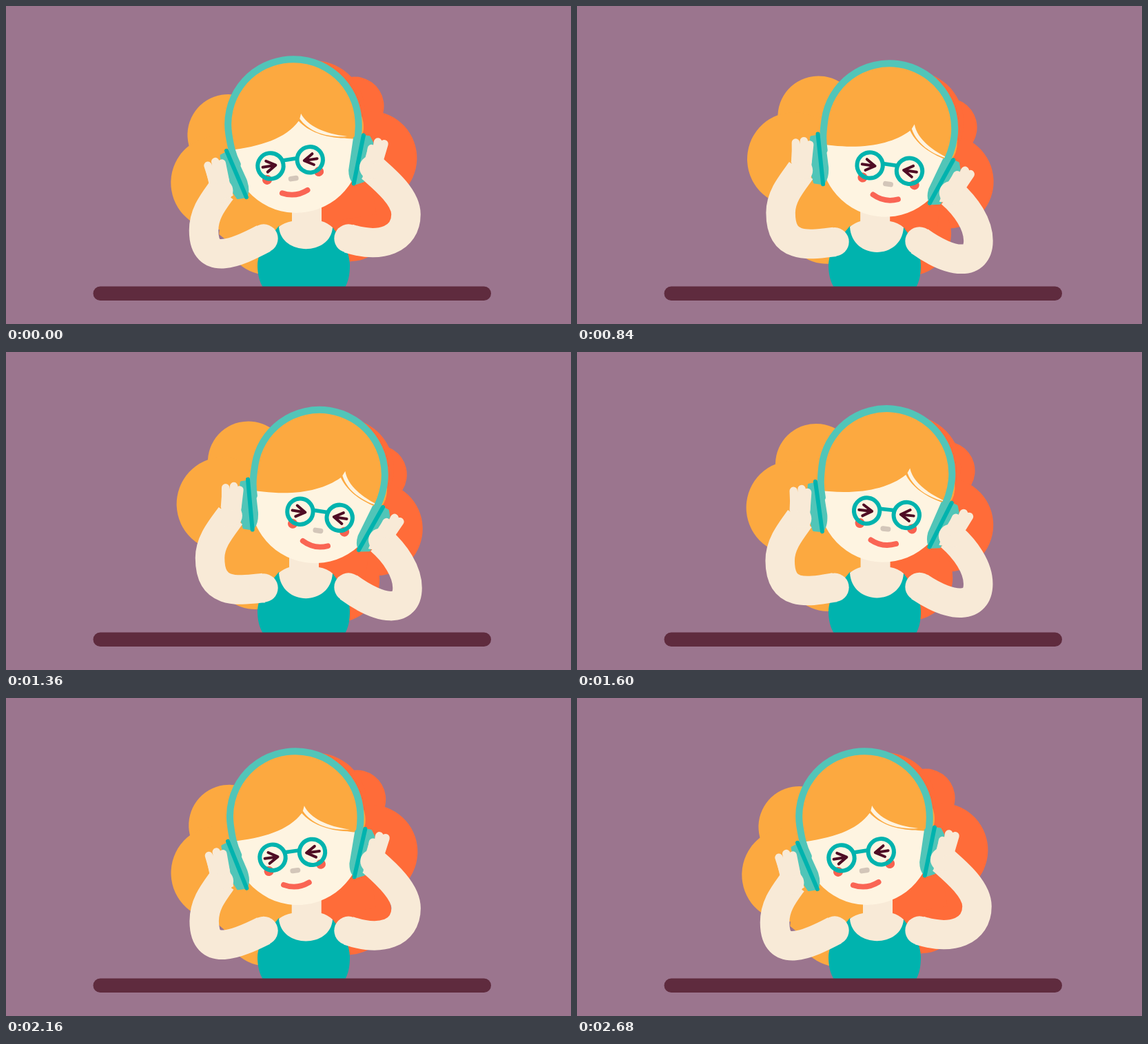
Write an HTML page that moves like this. It is 820 px wide and 461 px high and loops after 2.72 s.

```html
<!DOCTYPE html>
<html lang="en">
<head>
<meta charset="utf-8">
<title>Listening to music</title>
<style>
  html, body { margin: 0; width: 100%; height: 100%; overflow: hidden; background: #9b758e; }
  svg { display: block; width: 100%; height: 100%; }
  .line { fill: none; stroke-linecap: round; stroke-linejoin: round; }
  .yellow { fill: #fca940; }
  .orange { fill: #ff6c39; }
  .skin { fill: #f8ead7; }
  .finger { stroke: #f8ead7; }
  .arm { fill: none; stroke: #f8ead7; stroke-width: 42.5; }
  .face { fill: #fef4e1; }
  .teal { fill: #00b3ae; }
  .rim { stroke: #00b3ae; stroke-width: 6; }
  .pad { fill: #51c5b8; stroke: #51c5b8; stroke-width: 4; stroke-linejoin: round; }
  .eye { stroke: #4f0c24; stroke-width: 4; }
</style>
</head>
<body>
<svg viewBox="0 0 820 461">
  <defs>
    <clipPath id="skull">
      <path d="M341 175A95 95 0 0 1 531 175L530 205A95 97 0 0 1 340 205Z"/>
    </clipPath>
  </defs>

  <g id="hair">
    <g class="orange">
      <circle cx="524" cy="160" r="42.5"/>
      <circle cx="534" cy="238" r="68"/>
      <circle cx="490" cy="320" r="62"/>
      <path d="M430 170H530V320H430Z"/>
    </g>
    <g class="yellow">
      <circle cx="336" cy="172" r="59"/>
      <circle cx="310" cy="238" r="68"/>
      <circle cx="370" cy="320" r="62"/>
      <path d="M340 170H434V340H325L300 312Z"/>
    </g>
  </g>

  <path class="teal" d="M396 319C378 340 365 357 365 376C365 389 368 400 373 408H492C497 399 499 389 499 376C499 357 488 339 474 321Z"/>
  <path class="skin" id="chest"/>

  <g class="head">
    <circle class="orange" cx="468" cy="160" r="74.5"/>
    <ellipse class="yellow" cx="529" cy="186" rx="8" ry="20"/>
    <g clip-path="url(#skull)">
      <path class="face" d="M330 70H540V310H330Z"/>
      <g class="shift">
        <path class="yellow" id="fringe"/>
        <path class="face" d="M461 161C467 180 490 195 522 204C491 201 468 188 458 168Z"/>
      </g>
    </g>
    <g class="shift">
      <g fill="#f8614f">
        <circle cx="397.5" cy="248" r="7"/>
        <circle cx="473.5" cy="248" r="7"/>
      </g>
      <g class="line rim">
        <circle cx="405.5" cy="229" r="18.7"/>
        <circle cx="463.5" cy="229" r="18.7"/>
        <path stroke-linecap="butt" d="M424 224H445" stroke-width="5.5"/>
      </g>
      <path class="line eye" d="M400 221L413 229L400 237M394 229H413M468 221L455 229L468 237M474 229H455"/>
      <rect x="428" y="248.5" width="15" height="7.4" rx="3.7" fill="#d3c6b9"/>
      <path class="line" d="M416 270.5Q434 280 453 272" stroke="#fa6554" stroke-width="7.8"/>
    </g>
    <path class="line" d="M347 218C342 202 341.5 190 341.5 173A94.75 94 0 0 1 531 173C531 190 527 205 522 218" stroke="#51c5b8" stroke-width="10"/>
    <path class="pad" d="M326 202L338 198L345 206L355 242Q358 258 352 266L340 266L328 240Z"/>
    <path class="pad" d="M536 207L542 209L545 218L524 270L512 272Q505 266 507 252L521 207Z"/>
    <path class="line rim" d="M334.5 196L352.5 267M534.5 205L509.5 272"/>
  </g>

  <g id="arms"></g>

  <g class="head">
    <path class="skin" d="M300 214L329 213L334 262L316 264L302 242Z"/>
    <path class="line finger" d="M304.5 213L308 236M316 209L318 238M325 213L326 238" stroke-width="11.5"/>
    <path class="skin" d="M537 226L566 226L557 244L540 268L523 268L528 246Z"/>
    <path class="line finger" d="M543 226L537 246M553.5 218L546 242M562 222L552 243" stroke-width="12"/>
  </g>

  <rect x="126.5" y="406.5" width="577.5" height="20.5" rx="10.25" fill="#5f2b3e"/>
</svg>
<script>
  const HALF = 1360, SWING = 960, TILT = 9;
  const NECK = { x: 415, y: 295 };
  const $ = id => document.getElementById(id);
  const set = (el, attrs) => Object.entries(attrs).forEach(([k, v]) => el.setAttribute(k, v));
  const heads = document.querySelectorAll('.head');
  const shifts = document.querySelectorAll('.shift');

  function add(name, attrs) {
    const el = document.createElementNS('http://www.w3.org/2000/svg', name);
    set(el, attrs);
    return $('arms').appendChild(el);
  }

  const makeArm = () => ({
    limb: add('path', { class: 'arm' }),
    shoulder: add('circle', { class: 'skin', r: 20.7 }),
    wrist: add('circle', { class: 'skin', r: 17 })
  });
  const leftArm = makeArm(), rightArm = makeArm();

  // Sine swing followed by a slight settling drift.
  function progress(t) {
    const swing = 0.5 - 0.5 * Math.cos(Math.PI * Math.min(t / SWING, 1));
    return 0.985 * swing + 0.015 * t / HALF;
  }

  // A point that follows the tilting head.
  function onHead(x, y, s) {
    const a = TILT * s * Math.PI / 180, dx = x - NECK.x, dy = y - NECK.y;
    return [
      NECK.x + dx * Math.cos(a) - dy * Math.sin(a),
      NECK.y + dx * Math.sin(a) + dy * Math.cos(a)
    ];
  }

  // The limb leaves the shoulder along `out`, passes the elbow upright and reaches the wrist along `reach`.
  function drawArm(arm, [sx, sy], out, [ex, ey], bend, [wx, wy], reach) {
    set(arm.limb, {
      d: `M${sx} ${sy}C${sx + out[0]} ${sy + out[1]} ${ex} ${ey + bend} ${ex} ${ey}` +
         `C${ex} ${ey - 24} ${wx + reach[0]} ${wy + reach[1]} ${wx} ${wy}`
    });
    set(arm.shoulder, { cx: sx, cy: sy });
    set(arm.wrist, { cx: wx, cy: wy });
  }

  // s runs from -1 (tilted left) to 1 (tilted right).
  function pose(s) {
    set($('hair'), { transform: `rotate(${9.2 * s} 422 264)` });
    heads.forEach(g => set(g, { transform: `rotate(${TILT * s} ${NECK.x} ${NECK.y})` }));
    shifts.forEach(g => set(g, { transform: `translate(${11.3 * s} ${1.2 * s})` }));
    set($('fringe'), {
      d: `M300 60H570V212C550 212 530 210 518 206C490 201 467 188 456 171` +
         `C434 193 396 ${203 + 4 * s} 348 ${203 + 6 * s}L300 ${203 + 8 * s}Z`
    });

    const left = 413 - 2 * s, right = left + 43;
    const dip = (274.5 + 2.5 * s) / 0.75;
    set($('chest'), {
      d: `M${left} 280V312Q404 314 396 320C399 ${dip} 471 ${dip} 474 321Q466 314 ${right} 312V280Z`
    });

    drawArm(leftArm, [374, 339.5 + 2.5 * s], [-38, 12 - 8 * s],
      [291.5 + 4.5 * s, 312 - 13.5 * s], 54, onHead(318, 252, s), [-13, 18]);
    drawArm(rightArm, [497, 339 + 2 * s], [48, 25 + 10 * s],
      [581.5 + s, 322 + 20 * s], 36, onHead(538, 253, s), [22, 19]);
  }

  const start = performance.now();
  function tick() {
    const t = (performance.now() - start) % (2 * HALF);
    const p = t < HALF ? progress(t) : 1 - progress(t - HALF);
    pose(2 * p - 1);
    requestAnimationFrame(tick);
  }
  tick();
</script>
</body>
</html>
```
